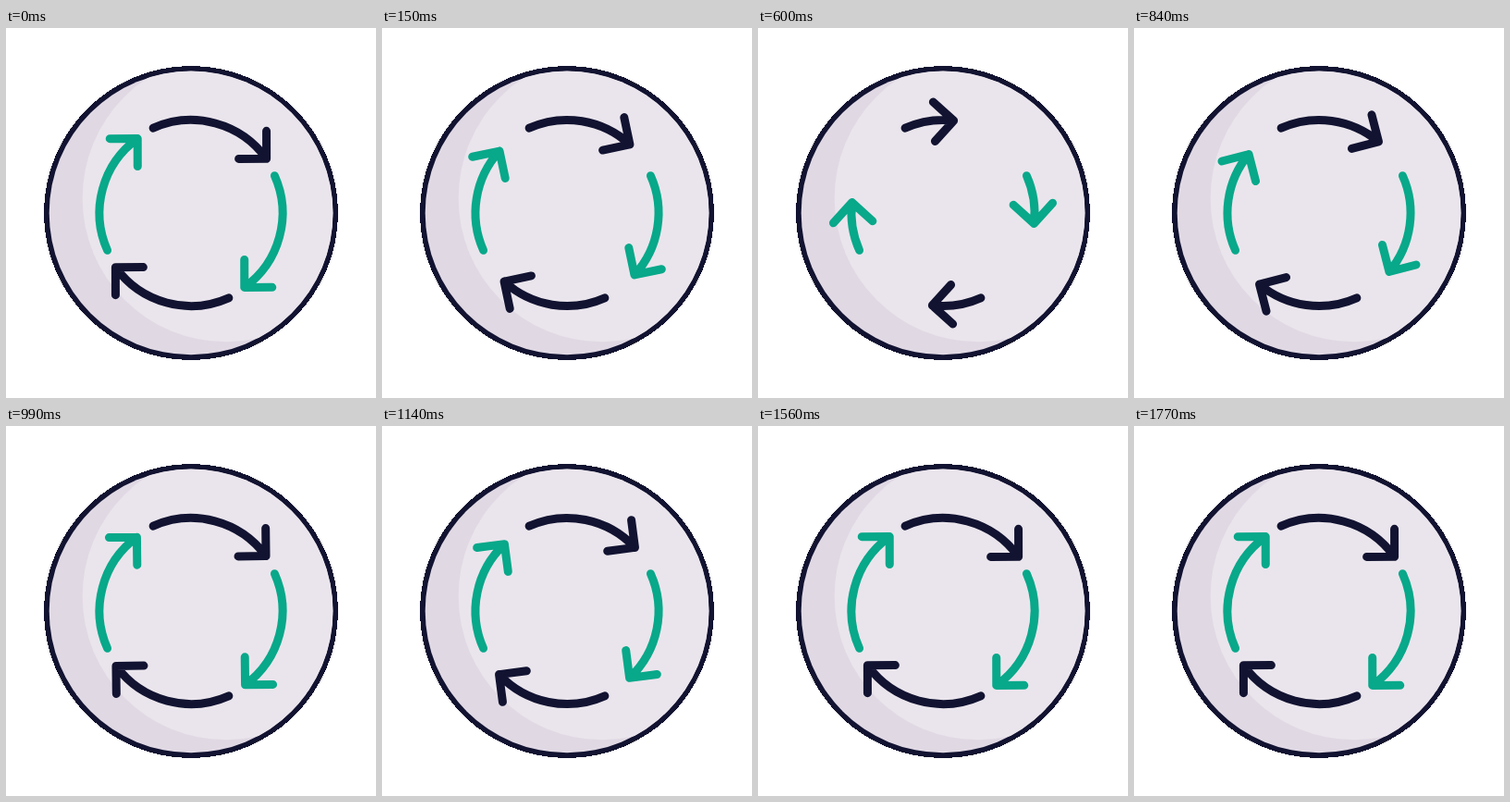
These frames come from a looping animation (400 px wide and 400 px high, 3.83 s). An HTML page:

```html
<!DOCTYPE html>
<html lang="en">
<head>
<meta charset="utf-8">
<title>Cycle arrows</title>
<style>
  html, body { margin: 0; height: 100%; overflow: hidden; background: #fff; }
  svg { display: block; width: 100%; height: 100%; }
  .arrow { fill: none; stroke-width: 9; stroke-linecap: round; stroke-linejoin: round; }
</style>
</head>
<body>
<svg viewBox="-200 -200 400 400">
  <defs>
    <clipPath id="disc"><circle r="153.5"/></clipPath>
  </defs>
  <circle r="159" fill="#121331" shape-rendering="crispEdges"/>
  <circle r="153.3" fill="#e0d9e4"/>
  <circle cx="38" cy="-16" r="155.3" fill="#eae5ec" clip-path="url(#disc)"/>
  <g id="arrows"></g>
</svg>
<script>
const LOOP = 3830;
const START = -24;      // tail angle, degrees clockwise from the top
const HEAD_LAG = 9.4;   // the head turns slightly less than the arc
const HEAD_ARM = 30;
const DARK = '#121331', GREEN = '#08a88a';

// Tip angle over time: shrink, grow back, small rebound, rest.
const KEYS = [[0, 54.3], [480, 2], [500, 2], [1026, 54.3], [1197, 44.6], [1438, 54.3], [LOOP, 54.3]];

const arrows = [0, 90, 180, 270].map(turn => {
  const green = turn % 180 !== 0;
  const path = document.createElementNS('http://www.w3.org/2000/svg', 'path');
  path.setAttribute('class', 'arrow');
  path.setAttribute('stroke', green ? GREEN : DARK);
  path.setAttribute('transform', `rotate(${turn})`);
  document.getElementById('arrows').append(path);
  return { path, radius: green ? 99 : 100.5 };
});

const rad = degrees => degrees * Math.PI / 180;
const onCircle = (r, angle) => [r * Math.sin(rad(angle)), -r * Math.cos(rad(angle))];

function tipAngle(time) {
  const i = KEYS.findIndex(([end]) => time < end);
  const [t0, a0] = KEYS[i - 1], [t1, a1] = KEYS[i];
  const eased = (1 - Math.cos(Math.PI * (time - t0) / (t1 - t0))) / 2;
  return a0 + (a1 - a0) * eased;
}

function arrowPath(r, angle) {
  const tail = onCircle(r, START), tip = onCircle(r, angle);
  const arm = side => {
    const a = rad(180 + angle - HEAD_LAG + side * 45);
    return [tip[0] + HEAD_ARM * Math.cos(a), tip[1] + HEAD_ARM * Math.sin(a)];
  };
  return `M${tail}A${r} ${r} 0 0 1 ${tip}M${arm(1)}L${tip}L${arm(-1)}`;
}

function draw() {
  const angle = tipAngle(performance.now() % LOOP);
  for (const { path, radius } of arrows) path.setAttribute('d', arrowPath(radius, angle));
  requestAnimationFrame(draw);
}
draw();
</script>
</body>
</html>
```
